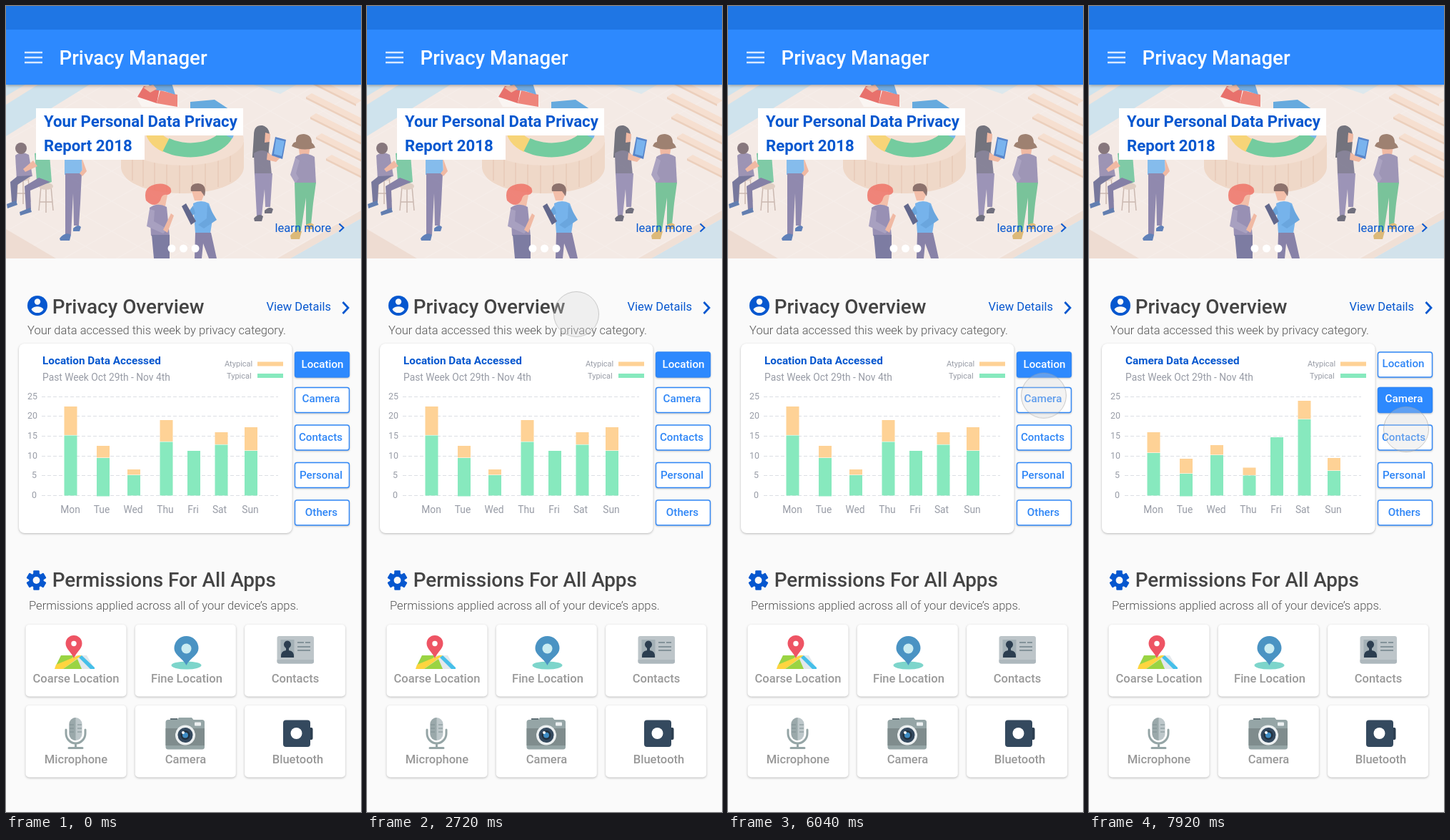
Recreate the animation shown at these times as an HTML page. Size 497 px wide and 1127 px high, loop 8000 ms.

```html
<!DOCTYPE html>
<html lang="en">
<head>
<meta charset="utf-8">
<title>Privacy Manager</title>
<style>
html, body { margin: 0; width: 100%; height: 100%; overflow: hidden; background: #fafafa; }
svg { display: block; width: 100%; height: 100%; }
text { font-family: Roboto, Arial, sans-serif; }
.bar-title { font-size: 27.6px; font-weight: 500; fill: #fff; }
.h2 { font-size: 27.85px; font-weight: 500; fill: #444; }
.sub { font-size: 16.56px; font-weight: 300; fill: #555; }
.hero-title { font-size: 22.2px; font-weight: 700; fill: #0657cf; }
.link { font-size: 16.56px; fill: #0657cf; }
.chart-title { font-size: 15.3px; font-weight: 700; fill: #0657cf; }
.range { font-size: 13.8px; fill: #989ca6; }
.legend { font-size: 11.04px; fill: #989ca6; }
.axis { font-size: 12.42px; fill: #989ca6; text-anchor: end; }
.day { font-size: 13.8px; fill: #989ca6; text-anchor: middle; }
.tab text { font-size: 15.2px; font-weight: 500; fill: #2f86f6; text-anchor: middle; }
.tab rect { fill: #fff; stroke: #2f86f6; stroke-width: 1.4; filter: drop-shadow(0 1.5px 1px rgba(0,0,0,.22)); }
.tab.on rect { fill: #2d89fe; }
.tab.on text { fill: #fff; }
.card { fill: #fff; filter: drop-shadow(0 1.5px 1.8px rgba(0,0,0,.26)); }
.perm { font-size: 16.56px; font-weight: 500; fill: #999; text-anchor: middle; }
.chev { fill: none; stroke: #0657cf; }

.before { animation: leave 8s step-end infinite; }
.after { animation: enter 8s step-end infinite; }
@keyframes leave { 0% { opacity: 1 } 77.5%, 100% { opacity: 0 } }
@keyframes enter { 0% { opacity: 0 } 77.5%, 100% { opacity: 1 } }

.bar { animation: grow 8s infinite; }
@keyframes grow {
  0%, 77% { y: var(--y0); height: var(--h0); animation-timing-function: ease }
  81.5%, 100% { y: var(--y1); height: var(--h1) }
}

.cursor { fill: rgba(215,215,215,.3); stroke: rgba(160,160,160,.55); animation: roam 8s linear infinite; }
@keyframes roam {
  0%, 10.5% { transform: translate(512px,-40px) }
  12% { transform: translate(474px,78px) }
  14% { transform: translate(423px,218px); animation-timing-function: cubic-bezier(.25,.45,.55,1) }
  19.5%, 27% { transform: translate(300px,418px) }
  28.5% { transform: translate(311px,406px) }
  30% { transform: translate(302px,395px) }
  32% { transform: translate(282px,411px) }
  34% { transform: translate(293px,431px); animation-timing-function: ease-out }
  37.5% { transform: translate(297px,414px) }
  38.5%, 46% { transform: translate(297px,421px) }
  48.5% { transform: translate(359px,447px); animation-timing-function: cubic-bezier(.3,.4,.6,1) }
  50.5%, 53.5% { transform: translate(415.5px,487px); animation-timing-function: ease-in-out }
  57.5%, 63.5% { transform: translate(426.5px,538.5px); animation-timing-function: ease-in-out }
  65.5%, 75% { transform: translate(442px,545px) }
  75.5%, 94% { transform: translate(442px,544.7px); animation-timing-function: ease-in-out }
  99%, 100% { transform: translate(444px,592px) }
}
</style>
</head>
<body>
<svg viewBox="0 0 497 1127" preserveAspectRatio="none">
<defs>
  <clipPath id="hero"><path d="M0 108H497V353H0z"/></clipPath>
  <pattern id="tiles" width="74" height="42" patternUnits="userSpaceOnUse">
    <path d="M0 21L37 0L74 21L37 42z" fill="none" stroke="#f6eeea"/>
  </pattern>
  <g id="plank">
    <path d="M0 0L80 40L72 45L-8 5z" fill="#f6dfd0"/>
    <path d="M-8 5L72 45V48L-8 8z" fill="#eccfbc"/>
  </g>
  <g id="stool" fill="none" stroke="#c4b0a8" stroke-width="1.5">
    <path d="M-7 0L-10 34M7 0L10 34M0 2V37M-9 22H9"/>
    <ellipse rx="10" ry="5" fill="#dccabf" stroke="none"/>
  </g>
</defs>
<rect width="497" height="1127" fill="#fafafa"/>

<g clip-path="url(#hero)">
  <path d="M0 108H497V353H0z" fill="#f4eae5"/>
  <path d="M0 108H497V353H0z" fill="url(#tiles)"/>
  <path d="M0 108H120L0 182z" fill="#cfe3ed"/>
  <path d="M0 126L30 108H48L0 138z" fill="#f1e5dd"/>
  <path d="M0 312L70 353H0z" fill="#eedcd2"/>
  <path d="M398 353L497 297V353z" fill="#d2e2eb"/>
  <path d="M380 353L497 286V297L398 353z" fill="#f0e0d6"/>
  <path d="M340 108H410L384 123z" fill="#dde8ed"/>
  <use href="#plank" x="418" y="92"/><use href="#plank" x="428" y="122"/>
  <use href="#plank" x="434" y="150"/><use href="#plank" x="442" y="178"/>
  <use href="#plank" x="456" y="208"/>

  <!-- round table with ring chart -->
  <path d="M161 190V226C166 274 328 274 333 226V190z" fill="#efd8c8"/>
  <path d="M177 205V244M192 212V252M208 217V257M225 220V260M243 221V262M261 221V261M279 218V258M297 213V253M314 206V246" stroke="#e6c8b6" stroke-width="1.3"/>
  <ellipse cx="247" cy="187" rx="86" ry="36" fill="#f3dfd2"/>
  <g fill="none" stroke-width="20">
    <path d="M205 169A52 30 0 0 0 224 195" stroke="#f7d478"/>
    <path d="M224 194A52 30 0 0 0 308 180" stroke="#74cc9f"/>
    <path d="M308 181A52 30 0 0 0 272 144" stroke="#79b9e6"/>
  </g>
  <path d="M258 134L292 131L321 150V164L300 146L258 145z" fill="#66aade"/>
  <path d="M183 129L192 115L238 123L242 141H190z" fill="#faf5f2"/>
  <path d="M184 127L193 112L215 116L211 136z" fill="#e8716c"/>
  <path d="M211 136L216 118L240 124V141z" fill="#ee857b"/>
  <path d="M198 108H232L237 124L222 119L206 117z" fill="#71abe2"/>
  <path d="M192 114L206 110L211 116L202 121z" fill="#f2beaa"/>

  <g opacity=".86">
    <!-- seated pair -->
    <use href="#stool" x="56" y="252"/><use href="#stool" x="24" y="240"/>
    <path d="M13 209Q22 202 32 208L37 238L15 243z" fill="#8f87ad"/>
    <path d="M40 206Q52 202 61 208L64 246Q52 252 43 244z" fill="#6dc59c"/>
    <path d="M46 240L62 246L34 258L35 284L28 285L26 252z" fill="#736f9c"/>
    <path d="M16 238L36 237L16 250L15 274L8 274L6 246z" fill="#646691"/>
    <path d="M19 288L34 282L36 288L20 293zM1 277L14 272L16 278L2 283z" fill="#4b6da8"/>
    <path d="M38 216L24 228L27 232L44 224z" fill="#f0b199"/>
    <circle cx="21" cy="199" r="8" fill="#76656c"/>

    <!-- standing man, left -->
    <path d="M82 208Q94 202 106 209L107 236H82z" fill="#73b5ee"/>
    <path d="M83 234H106L104 276L102 307H95L94 262L91 320H83z" fill="#807aa6"/>
    <path d="M106 212L113 231L107 238L103 234L107 229z" fill="#f0b199"/>
    <path d="M75 325Q83 315 91 320L89 328H76zM94 311Q101 304 105 309L103 315H94z" fill="#4870b2"/>

    <!-- front pair -->
    <path d="M211 262Q219 255 226 264L223 280H210z" fill="#f3b8a1"/>
    <path d="M196 272Q192 256 204 251Q220 245 230 254Q234 262 226 264Q218 262 216 272Q208 284 196 272z" fill="#ef7468"/>
    <path d="M201 282Q212 274 225 281L229 322Q214 328 203 321z" fill="#8a82ac"/>
    <path d="M201 284L197 308L220 318L226 312L207 301L208 286z" fill="#9c95ba"/>
    <path d="M204 320H229V353H207z" fill="#6a6b98"/>
    <path d="M220 313L231 290L235 293L226 317z" fill="#f0b199"/>
    <path d="M261 262Q260 252 270 250Q279 252 278 262L274 272H264z" fill="#f3b8a1"/>
    <path d="M259 259Q257 248 269 248Q282 249 278 266L273 259z" fill="#7d625f"/>
    <path d="M262 276Q273 270 284 276L290 292L286 318H265z" fill="#62aaec"/>
    <path d="M282 277L295 299L277 311L269 306L281 297z" fill="#549bdd"/>
    <path d="M262 279L252 292L257 296L265 290z" fill="#549bdd"/>
    <path d="M246 280L252 276L266 301L259 306z" fill="#4b527d"/>
    <path d="M265 317H287L295 353H284L276 332L274 353H264z" fill="#77729f"/>

    <!-- woman with tablet -->
    <path d="M347 180Q347 166 359 167Q371 170 369 188L367 212H345z" fill="#5f606d"/>
    <path d="M363 177L370 179L369 190L362 191z" fill="#f0b199"/>
    <path d="M347 206Q358 198 369 206L372 236H348z" fill="#76738c"/>
    <path d="M366 205L377 211L386 204L388 208L378 218L365 215z" fill="#f0b199"/>
    <path d="M377 183L392 187L387 214L372 209z" fill="#3f74c4"/>
    <path d="M378 186L390 189L386 210L375 207z" fill="#65abf0"/>
    <path d="M348 234H373L370 281H363L362 256L358 293H351z" fill="#8e86b0"/>
    <path d="M347 297Q354 289 360 294L358 301H348zM362 286Q369 279 374 284L372 290H362z" fill="#5c5d6e"/>

    <!-- man with hat -->
    <path d="M409 191H427L424 208H411z" fill="#f0b199"/>
    <path d="M405 211Q418 202 432 211L434 248H404z" fill="#9089af"/>
    <path d="M405 212L398 236L405 248L410 241L406 234L411 216z" fill="#a098bc"/>
    <path d="M400 196Q402 190 406 190Q405 179 417 179Q428 180 428 191Q431 193 433 198Q416 204 400 196z" fill="#91705f"/>
    <path d="M404 247H434L430 276L427 306H420L420 268L413 314H406z" fill="#66bd8e"/>
    <path d="M398 321Q406 311 414 315L411 326H399zM420 306Q427 301 431 306L429 312H420z" fill="#d9b267"/>
  </g>
</g>

<path d="M42 143H332V181H194V215H42z" fill="#fff"/>
<text class="hero-title" x="53" y="169">Your Personal Data Privacy</text>
<text class="hero-title" x="53" y="202.5">Report 2018</text>
<text class="link" x="376.5" y="315.5">learn more</text>
<path class="chev" d="M466.5 304.5L472.5 310L466.5 315.5" stroke-width="2"/>
<g fill="#fff"><circle cx="232" cy="339" r="5.5"/><circle cx="248.5" cy="339" r="5.5"/><circle cx="265" cy="339" r="5.5"/></g>

<rect y="30" width="497" height="80" fill="#2d89fe" style="filter:drop-shadow(0 1.5px 2.5px rgba(0,0,0,.4))"/>
<rect width="497" height="33" fill="#1f76e4"/>
<path d="M26 65H51M26 72H51M26 79H51" stroke="#d9e9ff" stroke-width="2.3"/>
<text class="bar-title" x="74.5" y="81.5">Privacy Manager</text>

<circle cx="44" cy="419" r="14" fill="#0657cf"/>
<circle cx="44" cy="413.5" r="4.2" fill="#fafafa"/>
<path d="M35.6 424.6C35.7 421.8 41.2 420.3 44 420.3S52.3 421.8 52.4 424.6A10.1 10.1 0 0 1 35.6 424.6z" fill="#fafafa"/>
<text class="h2" x="64.7" y="429.5">Privacy Overview</text>
<text class="link" x="364.5" y="426">View Details</text>
<path class="chev" d="M471.5 414L479 422L471.5 430" stroke-width="2.8"/>
<text class="sub" x="30" y="459">Your data accessed this week by privacy category.</text>

<rect class="card" x="18" y="472" width="382.5" height="265" rx="8"/>
<text class="chart-title before" x="51" y="500.5">Location Data Accessed</text>
<text class="chart-title after" x="51" y="500.5">Camera Data Accessed</text>
<text class="range" x="51" y="524">Past Week Oct 29th - Nov 4th</text>
<text class="legend" x="306" y="503.5">Atypical</text>
<text class="legend" x="309" y="520.5">Typical</text>
<rect x="352" y="497.5" width="36" height="6" fill="#fed296"/>
<rect x="352" y="514" width="36" height="6" fill="#87e9be"/>
<g id="chart"></g>
<g id="tabs"></g>

<g fill="#0657cf" transform="translate(42.5 803)">
  <circle r="10.2"/>
  <rect id="tooth" x="-4.3" y="-13.8" width="8.6" height="27.6" rx="1.2"/>
  <use href="#tooth" transform="rotate(60)"/><use href="#tooth" transform="rotate(120)"/>
  <circle r="4.9" fill="#fafafa"/>
</g>
<text class="h2" x="64.7" y="812">Permissions For All Apps</text>
<text class="sub" x="32" y="844">Permissions applied across all of your device’s apps.</text>
<g id="perms"></g>

<!-- coarse location -->
<path d="M77 908H113L124 927H68z" fill="#e3e8ec"/>
<path d="M77 908H97L91 913L70 922z" fill="#9ad443"/>
<path d="M68 927L70 921L92 912L101 908H106L80 927z" fill="#ffd53f"/>
<path d="M80 927L100 913L106 927z" fill="#9ad443"/>
<path d="M102 911L106 908L124 925V927H118z" fill="#46bfe9"/>
<path d="M95 912C92 904 83.5 899 83.5 891.5A11.5 11.5 0 0 1 106.5 891.5C106.5 899 98 904 95 912z" fill="#ee5464"/>
<circle cx="95" cy="891.5" r="3.7" fill="#fff"/>
<!-- fine location -->
<ellipse cx="252.5" cy="922" rx="21" ry="5.5" fill="#7dd5cb"/>
<path d="M252.5 922C248 912 235.5 908 235.5 898A17 17 0 0 1 269.5 898C269.5 908 257 912 252.5 922z" fill="#4a93c3"/>
<circle cx="252.5" cy="898.5" r="7" fill="#c9ecf2"/>
<!-- contacts -->
<rect x="379.5" y="881" width="51.5" height="38.5" rx="3" fill="#bdc5c9"/>
<rect x="384.5" y="886" width="19" height="25" fill="#a3b0b6"/>
<path d="M385 911Q384 902 392 901V898A5 5.5 0 1 1 396 898V901Q404 902 403 911z" fill="#2c3e50"/>
<path d="M408 890H417M419 890H426M408 896H426M408 901H426" stroke="#84939a" stroke-width="2"/>
<path d="M379.5 914H431V916.5Q431 919.5 428 919.5H382.5Q379.5 919.5 379.5 916.5z" fill="#aeb8bd"/>
<!-- microphone -->
<rect x="88.5" y="995" width="18" height="32" rx="9" fill="#bdc7ca"/>
<path d="M97.5 995A9 9 0 0 0 88.5 1004V1018A9 9 0 0 0 97.5 1027z" fill="#9aa8aa"/>
<path d="M89 1005H95M89 1010H95M89 1015H95M100 1005H106M100 1010H106M100 1015H106" stroke="#7f8f92"/>
<path d="M84 1012V1017A13.5 14 0 0 0 111 1017V1012M97.5 1031V1037M88 1037.5H107" fill="none" stroke="#95a5a6" stroke-width="3" stroke-linecap="round"/>
<!-- camera -->
<path d="M230 999V996H240V999z" fill="#5f6f75"/>
<rect x="223.5" y="998" width="54.5" height="41.5" rx="3.5" fill="#95a5a6"/>
<path d="M223.5 1010H278V1034H223.5z" fill="#7f8c8d"/>
<path d="M238 1000L242 995H260L264 1000z" fill="#95a5a6"/>
<rect x="264" y="1001.5" width="9" height="5" rx="1" fill="#ecf0f1"/>
<circle cx="251" cy="1019.5" r="14" fill="#ecf0f1"/>
<circle cx="251" cy="1019.5" r="10.5" fill="#34495e"/>
<circle cx="251" cy="1019.5" r="6.5" fill="#22313f"/>
<circle cx="251" cy="1019.5" r="4" fill="#3f8cc4"/>
<circle cx="248" cy="1016" r="2" fill="#fff"/>
<!-- wireless chip -->
<rect x="420" y="1009" width="9.5" height="17" rx="2" fill="#2c3e50"/>
<rect x="388" y="998.5" width="38" height="37.5" rx="4" fill="#34495e"/>
<circle cx="406.5" cy="1017" r="8" fill="#fff"/>

<circle class="cursor" r="31.5"/>
</svg>
<script>
const put = (id, html) => document.getElementById(id).innerHTML = html;

// label, label x, bar x, then [typical top, total top] for each data set
const days = [
  ['Mon', 90, 81.5, [600.5, 560], [625, 596]],
  ['Tue', 134, 127, [632, 615], [654, 633]],
  ['Wed', 178, 170, [656, 648], [628, 614]],
  ['Thu', 223, 215.5, [609.5, 579], [656.5, 645.5]],
  ['Fri', 262, 254, [622, 622], [603, 603]],
  ['Sat', 299, 292.5, [613.5, 596], [578, 552]],
  ['Sun', 342, 334, [622, 589], [650, 632]]
];
const grid = [[25, 546], [20, 573], [15, 601], [10, 629], [5, 656], [0, 684]];
const gap = .6;

const bar = (x, fill, y0, h0, y1, h1) =>
  `<rect class="bar" x="${x}" width="18" fill="${fill}" style="--y0:${y0}px;--h0:${h0}px;--y1:${y1}px;--h1:${h1}px"/>`;

put('chart', grid.map(([n, y]) =>
  `<text class="axis" x="${n > 5 ? 44 : 43}" y="${y + 4}">${n}</text>
   <path d="M50 ${y + .5}H381" stroke="#dcdfe4" stroke-dasharray="5 3"/>`).join('') +
  days.map(([name, tx, x, [a, top], [b, top2]]) => {
    const base = name === 'Tue' ? 685.5 : 684.5;
    const extra = a === top ? '' : bar(x, '#fed296', top, a - top - gap, top2, b - top2 - gap);
    return bar(x, '#87e9be', a, base - a, b, base - b) + extra +
      `<text class="day" x="${tx}" y="709">${name}</text>`;
  }).join(''));

const tab = (label, y, tx, ty, cls = '') =>
  `<g class="tab ${cls}"><rect x="404.5" y="${y}" width="76" height="35" rx="3"/>
   <text x="${tx}" y="${ty}">${label}</text></g>`;

put('tabs',
  tab('Location', 484, 443, 506, 'on before') + tab('Location', 484, 440, 505, 'after') +
  tab('Camera', 533.5, 441, 554, 'before') + tab('Camera', 533.5, 441, 554, 'on after') +
  tab('Contacts', 586, 440.5, 608) + tab('Personal', 638.5, 441, 661) + tab('Others', 691, 441.5, 713));

const perms = [
  ['Coarse Location', 98], ['Fine Location', 253], ['Contacts', 405],
  ['Microphone', 98], ['Camera', 251.5], ['Bluetooth', 408.5]
];
put('perms', perms.map(([name, tx], i) => {
  const x = 27.5 + i % 3 * 153.3, y = 865 + (i > 2) * 113;
  return `<rect class="card" x="${x}" y="${y}" width="141" height="100.5" rx="5"/>
    <text class="perm" x="${tx}" y="${y + 81}">${name}</text>`;
}).join(''));
</script>
</body>
</html>
```
